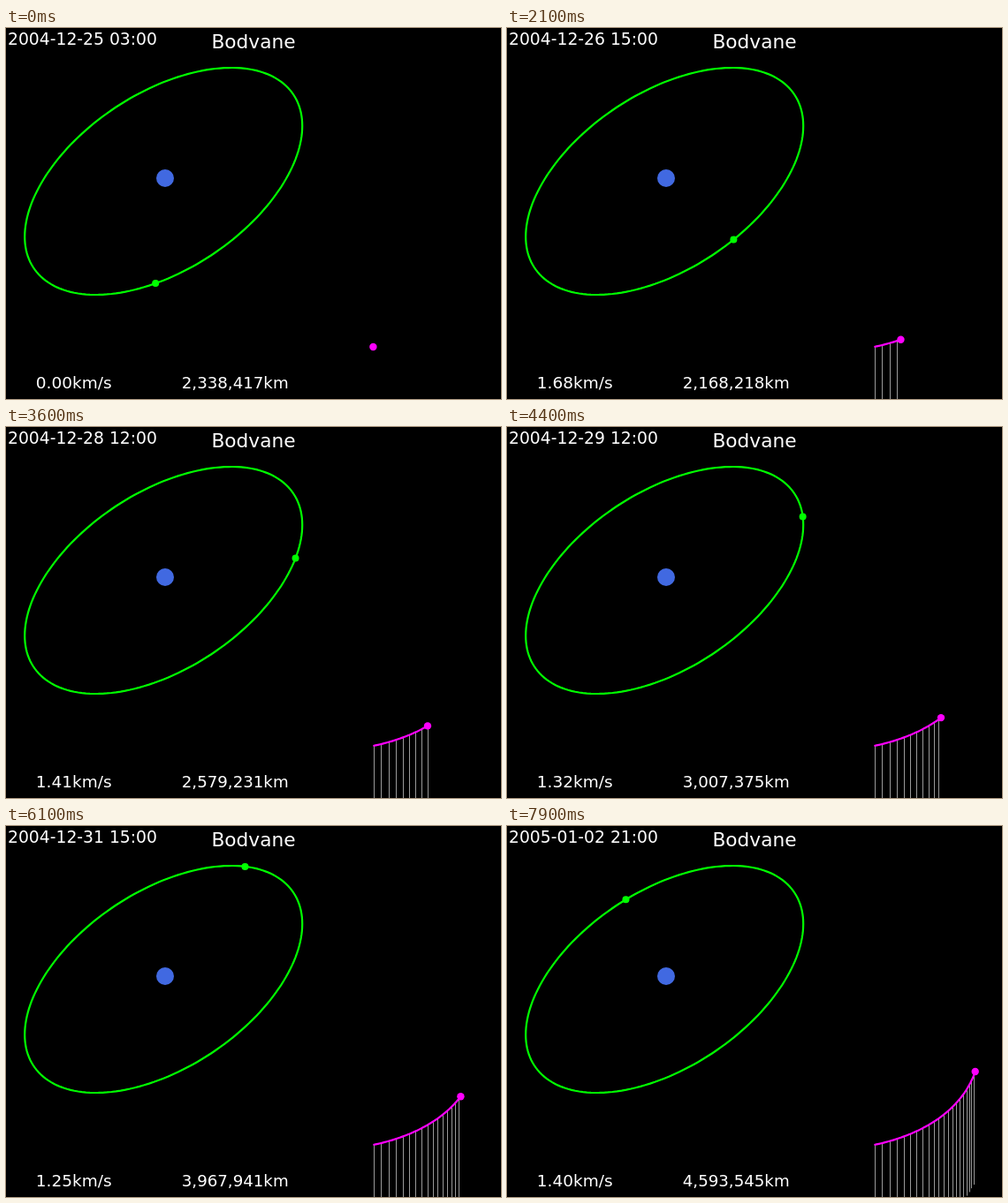
These frames come from a looping animation (560 px wide and 420 px high, 8 s). An HTML page:

```html
<!DOCTYPE html>
<html lang="en">
<head>
<meta charset="utf-8">
<title>Probe trajectory</title>
<style>
  html, body { margin: 0; width: 100%; height: 100%; overflow: hidden; background: #000; }
  svg { display: block; width: 560px; height: 420px; }
  text { fill: #fff; font: 18.5px "DejaVu Sans", sans-serif; white-space: pre; }
  path { fill: none; stroke-width: 2.2; }
</style>
</head>
<body>
<svg viewBox="0 0 560 420">
  <path id="orbit" stroke="#0f0"/>
  <circle cx="180" cy="170" r="10" fill="#4169e1"/>
  <path id="drops" stroke="#999" style="stroke-width:1"/>
  <path id="trail" stroke="#f0f"/>
  <circle id="moon" r="4" fill="#0f0"/>
  <circle id="probe" r="4.2" fill="#f0f"/>
  <text id="date" x="2" y="19" style="font-size:18.75px"></text>
  <text x="280" y="23" text-anchor="middle" style="font-size:21.7px">Bodvane</text>
  <text id="speed" x="33.8" y="408"></text>
  <text id="distance" x="198.8" y="408" style="font-size:18.2px"></text>
</svg>
<script>
const LOOP = 8000, STEP = 100, HOLD = 1000, HOURS_PER_STEP = 3;
const START = Date.UTC(2004, 11, 25, 3);
const RAD = Math.PI / 180;
const $ = id => document.getElementById(id);

// Known readings as [hours, value]; values between follow a smooth polynomial.
const DISTANCE = [[0, 2338417], [18, 2206943], [54, 2250261], [105, 3007375],
                  [132, 3534565], [180, 4320418], [210, 4593545]];
const SPEED = [[18, 1.82], [54, 1.56], [105, 1.32], [132, 1.26], [180, 1.29], [210, 1.4]];

const interpolate = (nodes, t) => nodes.reduce((sum, [ti, v]) =>
  sum + nodes.reduce((p, [tj]) => tj === ti ? p : p * (t - tj) / (ti - tj), v), 0);

// Projected ellipse, angle in degrees.
const orbitPoint = a => [178.2 + 157 * Math.cos(a * RAD),
                         173.5 + 128.5 * Math.cos((a + 119.2) * RAD)];

function moonAt(h) {
  const mean = -152.56 + h * 360 / 382.7;
  let ecc = mean;
  for (let i = 0; i < 5; i++) ecc = mean + 1.65 * Math.sin(ecc * RAD);
  return orbitPoint(60 + ecc);
}

const probeAt = h => [415.4 + h * (0.896 - 0.001675 * h),
                      361 - h * (0.1868 + h * (0.001233 - 0.00000115 * h))];

const toPath = points => points.length ? "M" + points.map(p => p.map(v => v.toFixed(2))).join("L") : "";

function place(id, [x, y]) {
  $(id).setAttribute("cx", x);
  $(id).setAttribute("cy", y);
}

function draw(step) {
  const h = step * HOURS_PER_STEP;
  place("moon", moonAt(h));
  place("probe", probeAt(h));

  const trail = [];
  for (let t = 0; step && t <= h; t += HOURS_PER_STEP) trail.push(probeAt(t));
  $("trail").setAttribute("d", toPath(trail));

  let drops = "";
  for (let t = 0; t < h; t += 10) {
    const [x, y] = probeAt(t);
    const foot = Math.min(420, 406 + (200 - t) * 0.42);
    drops += `M${Math.round(x + 0.2) + 0.5} ${y}V${foot}`;
  }
  $("drops").setAttribute("d", drops);

  $("date").textContent = new Date(START + h * 3600000).toISOString().slice(0, 16).replace("T", " ");
  $("speed").textContent = (step ? interpolate(SPEED, h) : 0).toFixed(2) + "km/s";
  $("distance").textContent = Math.round(interpolate(DISTANCE, h)).toLocaleString("en-US") + "km";
}

$("orbit").setAttribute("d", toPath(Array.from({ length: 180 }, (_, i) => orbitPoint(i * 2))) + "Z");

const begin = performance.now();
let shown = -1;
function tick() {
  const time = (performance.now() - begin) % LOOP;
  const step = Math.max(0, Math.floor((time - HOLD) / STEP) + 1);
  if (step !== shown) draw(shown = step);
  requestAnimationFrame(tick);
}
tick();
</script>
</body>
</html>
```
